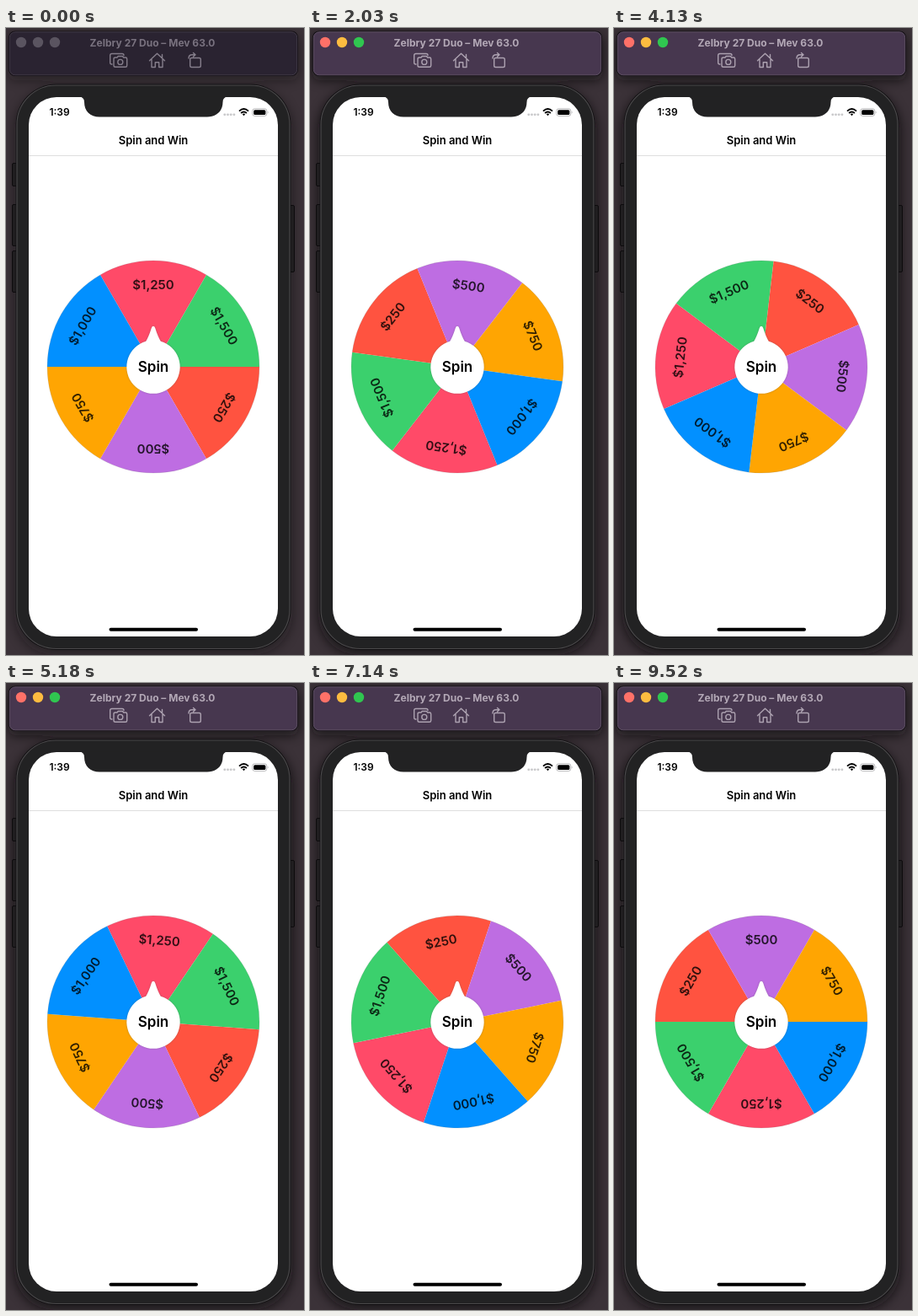
These frames come from a looping animation (354x744 px, 9590 ms). An HTML page:

```html
<!DOCTYPE html>
<html lang="en">
<head>
<meta charset="utf-8">
<title>Spin and Win</title>
<style>
  html, body { margin: 0; width: 100%; height: 100%; overflow: hidden; background: #383036; }
  svg { display: block; width: 100%; height: 100%; }
  text { font-family: Inter, "Liberation Sans", sans-serif; font-weight: 600; text-anchor: middle; }
  #bar { --fill: #2a2331; --ink: #79727f; --icon: #857e8b; --edge: #4b4551; }
  #bar.active { --fill: #47374f; --ink: #b3a8b6; --icon: #aca1b0; --edge: #6b5c70; }
  #bar circle { fill: #5a5460; }
  #bar.active circle:nth-of-type(1) { fill: #ff7168; }
  #bar.active circle:nth-of-type(2) { fill: #fdbc40; }
  #bar.active circle:nth-of-type(3) { fill: #30c650; }
  #icons { fill: none; stroke: var(--icon); stroke-width: 1.4; stroke-linejoin: round; stroke-linecap: round; }
</style>
</head>
<body>
<svg viewBox="0 0 354 744" xmlns="http://www.w3.org/2000/svg">
  <defs>
    <filter id="blur" x="-20%" y="-20%" width="140%" height="140%"><feGaussianBlur stdDeviation="7"/></filter>
    <filter id="soft" x="-20%" y="-20%" width="140%" height="140%"><feGaussianBlur stdDeviation="0.8"/></filter>
    <path id="knob" d="M175 353.8Q176.4 353.8 177.2 356Q180.3 366 183.8 371.7A31.7 31.7 0 1 1 166.2 371.7Q169.7 366 172.8 356Q173.6 353.8 175 353.8Z"/>
  </defs>
  <rect width="354" height="744" fill="#3b3238"/>
  <g id="shade" filter="url(#blur)" fill="#0c080b" opacity=".45">
    <rect x="3" y="8" width="344" height="54" rx="8"/>
    <rect x="10" y="72" width="330" height="672" rx="48"/>
  </g>

  <g id="bar">
    <rect x="3" y="3.500" width="344" height="53.500" rx="7.500" fill="#130e15"/>
    <rect x="4.300" y="4.800" width="341.400" height="51" rx="6.500" fill="var(--fill)" stroke="var(--edge)" stroke-width=".8"/>
    <circle cx="18" cy="17" r="6.200"/>
    <circle cx="38" cy="17" r="6.200"/>
    <circle cx="58" cy="17" r="6.200"/>
    <text x="174" y="21.600" font-size="12" style="font-weight:700" fill="var(--ink)">Zelbry 27 Duo – Mev 63.0</text>
    <g id="icons">
      <path d="M126 43H125.500Q123.700 43 123.700 41V32.500Q123.700 30.500 125.700 30.500H138Q140 30.500 140 32.500"/>
      <path d="M130 35H132L133.200 33.500H138.500L139.700 35H142Q143.700 35 143.700 36.700V44.500Q143.700 46.300 142 46.300H130Q128 46.300 128 44.500V36.700Q128 35 130 35Z"/>
      <circle cx="135.800" cy="40.400" r="3" style="fill:none"/>
      <path d="M170.500 38.700L179.500 30.200L188.500 38.700M173 37V46.500H177.300V40.800H181.700V46.500H186V37M185.500 35.500V31.500"/>
      <path d="M220.500 35.500H229.500Q231.300 35.500 231.300 37.300V44.700Q231.300 46.500 229.500 46.500H220.500Q218.700 46.500 218.700 44.700V37.300Q218.700 35.500 220.500 35.500ZM217 36Q217 31.800 221 31.800H225M222.500 29.500L225 31.800L222.500 34.100"/>
    </g>
  </g>

  <g fill="#201e20" stroke="#0d0b0d">
    <rect x="7.500" y="160.500" width="7" height="27" rx="1.500"/>
    <rect x="7.500" y="209.500" width="7" height="49" rx="1.500"/>
    <rect x="7.500" y="264.500" width="7" height="49" rx="1.500"/>
    <rect x="335.500" y="210.500" width="7" height="79" rx="1.500"/>
  </g>
  <rect x="11.500" y="66.500" width="327" height="671.500" rx="48" fill="#111012"/>
  <rect x="13" y="68" width="324" height="668.500" rx="46.500" fill="#222223" stroke="#4a484a" stroke-width="1.200"/>
  <rect x="27" y="82" width="296" height="640" rx="33" fill="#fff"/>
  <path d="M87 81.500Q93 82 93 88C93 98.500 100 105.500 111 105.500H239C250 105.500 257.500 98.500 257.500 88Q257.500 82 263.500 81.500Z" fill="#222223"/>

  <text x="63.500" y="104.200" font-size="12">1:39</text>
  <g fill="#c9c9cb">
    <rect x="258.500" y="101.500" width="2.600" height="2.600" rx=".8"/>
    <rect x="262.200" y="101.500" width="2.600" height="2.600" rx=".8"/>
    <rect x="265.900" y="101.500" width="2.600" height="2.600" rx=".8"/>
    <rect x="269.600" y="101.500" width="2.600" height="2.600" rx=".8"/>
  </g>
  <g fill="none" stroke="#000" stroke-width="1.900">
    <path d="M277 98.600Q282.500 93.500 288 98.600M279.100 101Q282.500 97.900 285.900 101"/>
    <path d="M280.800 102.200Q282.500 100.900 284.200 102.200L282.500 104.300Z" fill="#000" stroke="none"/>
  </g>
  <rect x="292.800" y="95.800" width="17" height="8.600" rx="2.600" fill="#fff" stroke="#a5a5a7" stroke-width=".8"/>
  <rect x="294.200" y="97.200" width="14.200" height="5.800" rx="1.500"/>
  <path d="M310.900 98.500Q312.300 100.100 310.900 101.700Z" fill="#a5a5a7"/>

  <text x="175" y="138.200" font-size="13">Spin and Win</text>
  <path d="M27 151.500H323" stroke="#dededf"/>

  <g id="wheel"></g>

  <use href="#knob" fill="#555" opacity=".4" filter="url(#soft)"/>
  <use href="#knob" fill="#fff"/>
  <text x="175" y="407.900" font-size="17">Spin</text>
  <rect x="122.500" y="711.700" width="105.500" height="4" rx="2"/>
</svg>
<script>
const LOOP = 9590, STEP = 70, STALL = 50;
const ACTIVATE = 700;
const SPIN_START = 1141.7, SPIN_SPEED = 1.022;         // degrees per ms
const SLOW_START = 4118.2, SLOW_TIME = 5004.5, TURN = 13 * 360 + 180;
const CX = 175, CY = 402, R = 126;

const prizes = [
  ['$1,250', '#ff4a68'], ['$1,500', '#3bd06d'], ['$250', '#ff5340'],
  ['$500', '#be6de2'], ['$750', '#ffa502'], ['$1,000', '#0290ff']
];
const bar = document.getElementById('bar');
const shade = document.getElementById('shade');
const wheel = document.getElementById('wheel');

const halfX = R * Math.sin(Math.PI / 6), halfY = R * Math.cos(Math.PI / 6);
wheel.innerHTML = prizes.map(([label, color], i) => `
  <g transform="rotate(${i * 60})">
    <path d="M0 0L${-halfX} ${-halfY}A${R} ${R} 0 0 1 ${halfX} ${-halfY}Z" fill="${color}"/>
    <text y="-91.700" font-size="15" opacity=".8">${label}</text>
  </g>`).join('') + `<circle r="${R}" fill="none" stroke="#777" stroke-opacity=".3" stroke-width=".6"/>`;

const bezier = (s, a, b) => 3 * (1 - s) ** 2 * s * a + 3 * (1 - s) * s * s * b + s ** 3;

function ease(x) {
  let lo = 0, hi = 1;
  for (let i = 0; i < 40; i++) {
    const mid = (lo + hi) / 2;
    if (bezier(mid, 0.0217, 0.675) < x) lo = mid; else hi = mid;
  }
  return bezier(lo, 0.874, 1);
}

function angleAt(t) {
  if (t < SPIN_START) return 0;
  if (t < SLOW_START) return (t - SPIN_START) * SPIN_SPEED;
  const x = (t - SLOW_START) / SLOW_TIME;
  return x >= 1 ? TURN : TURN * ease(x);
}

function draw(time) {
  let step = Math.floor((time % LOOP) / STEP + 1e-6);
  if (step === STALL) step--;
  const t = step * STEP;
  const active = t >= ACTIVATE;
  bar.classList.toggle('active', active);
  shade.setAttribute('opacity', active ? 0.7 : 0.45);
  wheel.setAttribute('transform', `translate(${CX} ${CY}) rotate(${(angleAt(t) % 360).toFixed(2)})`);
}

const start = performance.now();
function tick() {
  draw(performance.now() - start);
  requestAnimationFrame(tick);
}
draw(0);
requestAnimationFrame(tick);
</script>
</body>
</html>
```
